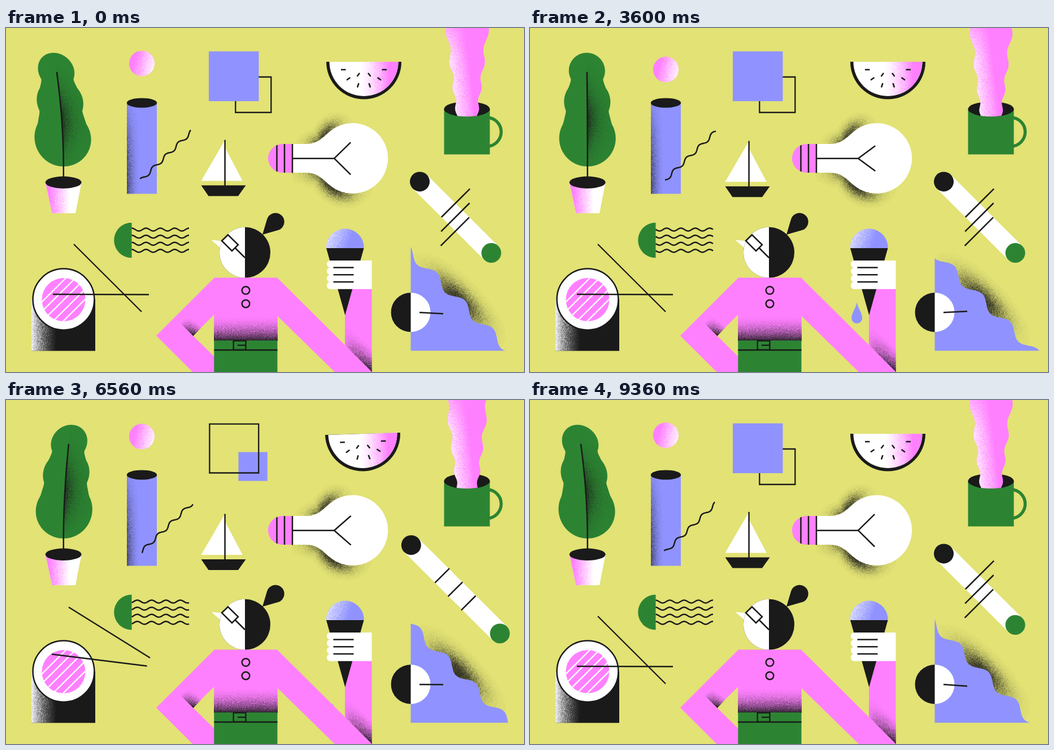
These frames come from a looping animation (917x611 px, 9.44 s). An HTML page with a canvas:

```html
<!DOCTYPE html>
<html lang="en">
<head>
<meta charset="utf-8">
<title>Shapes in motion</title>
<style>
html, body { margin: 0; width: 100%; height: 100%; overflow: hidden; background: #e2e275; }
canvas { display: block; }
</style>
</head>
<body>
<canvas id="stage" width="917" height="611"></canvas>
<script>
const ctx = document.getElementById('stage').getContext('2d');
const LOOP = 9440, STEP = 80, TAU = Math.PI * 2;
const BG = '#e2e275', PINK = '#ff80ff', BLUE = '#9093ff', GREEN = '#2c8432', INK = '#1a1a1a', WHITE = '#fff';

const clamp = (v, a = 0, b = 1) => Math.min(b, Math.max(a, v));
const mix = (a, b, k) => a + (b - a) * k;
const mixAll = (a, b, k) => a.map((v, i) => mix(v, b[i], k));
const ease = k => (1 - Math.cos(Math.PI * clamp(k))) / 2;
const bell = k => Math.exp(-k * k);

let seed = 7;
function rnd() {
  seed = (seed * 1664525 + 1013904223) >>> 0;
  return seed / 4294967296;
}

// Fine grained shade, drawn once; density(x, y) uses stage coordinates.
function grain(x, y, w, h, color, density) {
  const img = document.createElement('canvas');
  img.width = w;
  img.height = h;
  const g = img.getContext('2d');
  g.fillStyle = color;
  for (let j = 0; j < h; j++)
    for (let i = 0; i < w; i++) {
      const d = density(x + i, y + j);
      if (d < 0.01) continue;
      g.globalAlpha = clamp(d + (rnd() - 0.5) * 1.8 * d * (1 - d));
      g.fillRect(i, j, 1, 1);
    }
  return { img, x, y };
}

const svg = d => new Path2D(d);
function poly(...pts) {
  const p = new Path2D();
  for (let i = 0; i < pts.length; i += 2) p.lineTo(pts[i], pts[i + 1]);
  p.closePath();
  return p;
}
function box(x, y, w, h) {
  const p = new Path2D();
  p.rect(x, y, w, h);
  return p;
}
function oval(x, y, rx, ry = rx, a = 0, b = TAU) {
  const p = new Path2D();
  p.ellipse(x, y, rx, ry, 0, a, b);
  return p;
}
function fill(path, color) {
  ctx.fillStyle = color;
  ctx.fill(path);
}
function stroke(path, w = 2.5, color = INK) {
  ctx.lineWidth = w;
  ctx.strokeStyle = color;
  ctx.stroke(path);
}
function line(x1, y1, x2, y2, w = 2.5, color = INK) {
  const p = new Path2D();
  p.moveTo(x1, y1);
  p.lineTo(x2, y2);
  stroke(p, w, color);
}
function within(path, draw) {
  ctx.save();
  ctx.clip(path);
  draw();
  ctx.restore();
}
const dust = g => ctx.drawImage(g.img, g.x, g.y);
function shaded(path, color, g) {
  fill(path, color);
  within(path, () => dust(g));
}
function wave(x, y, dx, dy, count, amp, phase, w = 2.5) {
  const len = Math.hypot(dx, dy), nx = -dy / len, ny = dx / len, p = new Path2D();
  for (let i = 0; i <= 120; i++) {
    const s = i / 120, o = -amp * Math.cos(TAU * (count * s - phase));
    p.lineTo(x + dx * s + nx * o, y + dy * s + ny * o);
  }
  stroke(p, w);
}

const tex = {
  leaf: grain(60, 44, 110, 204, INK, (x, y) =>
    x < 102 ? 0 : 0.75 * Math.exp(-(x - 102) / 14) * bell((y - 162) / 50)),
  pot: grain(68, 274, 68, 58, PINK, x => clamp(1.1 - (x - 72) / 36)),
  ball: grain(-24, -24, 48, 48, WHITE, (x, y) => 0.9 * clamp((x + y * 0.25 + 14) / 36)),
  tube: grain(214, 130, 54, 166, INK, (x, y) =>
    0.55 * clamp(1 - (x - 214) / 24) ** 2 * clamp((y - 120) / 120, 0.2)),
  melon: grain(-64, 0, 130, 66, PINK, x => clamp((x + 8) / 52) ** 1.4),
  steam: grain(770, 0, 94, 160, WHITE, (x, y) =>
    0.75 * clamp(1 - (x - 816 + 0.122 * (313 - y)) / 34) * clamp(0.45 + y / 90)),
  bulb: grain(505, 150, 185, 170, INK, (x, y) => {
    const up = y < 231.5;
    const gap = Math.min(Math.hypot(x - 614, y - 231.5) - 62.5, Math.abs(y - 231.5) - 25.5);
    return 0.8 * bell(Math.max(gap, 0) / 14) * bell((x - (up ? 562 : 574)) / (up ? 24 : 36));
  }),
  sushi: grain(45, 480, 114, 94, WHITE, x => 0.9 * clamp(1 - (x - 46) / 44) ** 1.4),
  torso: grain(368, 500, 113, 56, INK, (x, y) => 0.92 * clamp((y - 508) / 47) ** 2.1),
  elbow: grain(296, 500, 60, 50, INK, (x, y) => {
    const q = (x - 331 - y + 546) / 1.414, r = (331 - x + 546 - y) / 1.414;
    return q < 0 || r < 0 ? 0 : clamp(1 - q / 22) ** 1.4 * clamp(1 - r / 32);
  }),
  wrist: grain(600, 520, 48, 91, INK, (x, y) =>
    0.9 * clamp(1 - (x - y - 37) / 44) ** 1.8 * clamp((x - 596) / 46)),
  scoop: grain(566, 352, 68, 40, WHITE, (x, y) =>
    0.75 * clamp(1 - (x - 568 + (y - 356) * 0.35) / 48)),
  slope: grain(722, 400, 190, 173, INK, (x, y) =>
    0.85 * bell(clamp(x - y - 318, 0, 99) / 27) * bell((x + y - 1282) / 76))
};

const bulbShape = svg('M507 206L530 206C552 206 560 195 573 184A62.5 62.5 0 1 1 573 279C560 268 552 257 530 257L507 257Z');
const bulbCap = svg('M507 206L489.5 206A25.5 25.5 0 0 0 489.5 257L507 257Z');
const scoopShape = svg('M567 391L567 386A33.5 33.5 0 0 1 633.5 386L633.5 391Z');
const dropShape = svg('M0 -19C2 -8 9.5 0 9.5 9A9.5 9.5 0 0 1 -9.5 9C-9.5 0 -2 -8 0 -19Z');

function plant(p) {
  const sway = -Math.cos(TAU * p);
  const bend = y => 12.9 * sway * (clamp(246 - y, 0, 200) / 170) ** 1.9;
  const lobes = [[76, 32], [131, 41], [196, 50]];
  const half = y => Math.cbrt(lobes.reduce((s, [c, r]) => s + Math.max(0, r * r - (y - c) ** 2) ** 1.5, 0));
  const leaf = new Path2D();
  for (let y = 44; y <= 246; y += 0.5) leaf.lineTo(101.8 + bend(y) - half(y), y);
  for (let y = 246; y >= 44; y -= 0.5) leaf.lineTo(101.8 + bend(y) + half(y), y);
  fill(leaf, GREEN);
  within(leaf, () => {
    const { img, x, y } = tex.leaf;
    for (let j = 0; j < img.height; j += 2)
      ctx.drawImage(img, 0, j, img.width, 2, x + Math.round(bend(y + j)), y + j, img.width, 2);
  });
  const stem = new Path2D();
  for (let y = 78; y <= 270; y += 4) stem.lineTo(101.8 + bend(y) * 0.95, y);
  stroke(stem);
  shaded(poly(70, 275, 133.5, 275, 123, 329, 81.5, 329), WHITE, tex.pot);
  fill(oval(101.7, 274.3, 32, 10.7), INK);
}

function cylinder(p2, p4) {
  ctx.save();
  ctx.translate(240.5, 68.6 - 6.2 * Math.cos(TAU * (p4 + 0.07)));
  shaded(oval(0, 0, 22.6), PINK, tex.ball);
  ctx.restore();
  shaded(box(214, 133, 53, 161.5), BLUE, tex.tube);
  fill(oval(240.5, 133, 26.7, 8.6), INK);
  wave(239.2, 270, 90, -86.5, 4, 3, p2);
}

function squares(e) {
  const [bx, by, bs] = mixAll([359, 41.5, 88.5], [412.3, 93.3, 50.7], e);
  const [ox, oy, os] = mixAll([406.3, 87, 63], [359.7, 42, 87.2], e);
  const outline = () => stroke(box(ox, oy, os, os), 2.3);
  if (e < 0.5) outline();
  fill(box(bx, by, bs, bs), BLUE);
  if (e >= 0.5) outline();
}

function melon(p) {
  const u = clamp((p - 0.05) / 0.4);
  const turn = -0.21 * Math.sin(3 * Math.PI * u) * (1 - u);
  ctx.save();
  ctx.translate(633.5 + 66.5 * turn, 60);
  ctx.rotate(turn);
  fill(oval(0, 0, 66.5, 66.5, 0, Math.PI), INK);
  shaded(oval(0, 0, 61, 61, 0, Math.PI), WHITE, tex.melon);
  for (const s of [-1, 1]) {
    line(s * 32, 14, s * 40.5, 14);
    line(s * 24, 28, s * 30.5, 32.5);
    line(s * 7.5, 20, s * 12, 26);
    line(s * 9, 38, s * 11.5, 45.5);
  }
  ctx.restore();
}

function mug(p) {
  stroke(oval(851, 184.6, 25.6), 5.5, GREEN);
  fill(box(775.5, 144, 81, 80.5), GREEN);
  fill(oval(816, 144, 40.7, 13.3), INK);
  const open = box(700, 0, 217, 144);
  open.addPath(oval(816, 144, 40.7, 13.3));
  const half = y => {
    const d = 313 - y, s = Math.log(d / 168) / Math.log(1.22) - p;
    return d * (0.115 + 0.0105 * Math.cos(TAU * s));
  };
  const steam = new Path2D();
  for (let y = -2; y <= 160; y++) steam.lineTo(816.3 - half(y), y);
  for (let y = 160; y >= -2; y--) steam.lineTo(816.3 + half(y), y);
  within(open, () => shaded(steam, PINK, tex.steam));
}

function bulb(p) {
  dust(tex.bulb);
  fill(bulbShape, WHITE);
  fill(bulbCap, PINK);
  for (const x of [479.5, 493]) within(bulbCap, () => line(x, 200, x, 262));
  line(507, 206, 507, 257.5);
  line(507, 231.7, 581, 231.7);
  const h = 16.5 + 12.3 * Math.cos(TAU * (p + 0.027)), x = 615 - 0.17 * h;
  for (const s of [-1, 1]) line(581, 231.7, x, 231.7 + s * h);
}

function boat(p) {
  ctx.save();
  ctx.translate(0, 2 - 2 * Math.cos(TAU * p));
  fill(poly(387, 200, 387, 271.5, 345.5, 271.5), WHITE);
  fill(poly(387, 211, 418.8, 271.5, 387, 271.5), WHITE);
  fill(poly(345.5, 279.5, 424.5, 279.5, 411, 298.5, 358.5, 298.5), INK);
  line(387.6, 198.8, 387.6, 280);
  ctx.restore();
}

function capsule(e) {
  const d = mix(63.3, 79, e), x = 795.8, y = 336.2;
  line(x - d, y - d, x + d, y + d, 35, WHITE);
  fill(oval(x - d, y - d, 17.5), INK);
  fill(oval(x + d, y + d, 17.5), GREEN);
  const r = mix(25.2, 12.4, e);
  for (const i of [-1, 0, 1]) {
    const cx = 795.4 + i * mix(-0.6, 24, e), cy = y + i * mix(25.4, 24.3, e);
    line(cx - r, cy + r, cx + r, cy - r);
  }
}

function jellyfish(p) {
  fill(oval(222.5, 377, 31.3, 31.3, Math.PI / 2, Math.PI * 1.5), GREEN);
  for (let i = 0; i < 4; i++) wave(222.5, 358 + i * 12.6, 101.5, 0, 4, 2.5, p);
}

function sushi(p) {
  shaded(box(45, 482, 113, 91.5), INK, tex.sushi);
  const roll = oval(102, 482, 54.4);
  fill(roll, WHITE);
  stroke(roll);
  const core = oval(102, 482.5, 38.5);
  fill(core, PINK);
  within(core, () => {
    for (const o of [-17, -8.5, 0.5, 10, 19])
      line(62 + o, 522 + o, 142 + o, 442 + o, 2.3, WHITE);
  });
  const crossed = [120, 384, 240, 504, 83, 473, 253, 473.5];
  const lifted = [111, 368, 255, 458, 81, 451.5, 249.5, 472.5];
  const joined = [98, 395, 260, 446.5, 88.5, 422.5, 245.5, 487];
  const d = Math.abs(p - 0.551);
  const pose = d > 0.16
    ? mixAll(lifted, crossed, ease((d - 0.162) / 0.046))
    : mixAll(joined, lifted, ease((d - 0.075) / 0.085));
  line(...pose.slice(0, 4), 2.3);
  line(...pose.slice(4), 2.3);
}

function drop(x, y, color) {
  ctx.save();
  ctx.translate(x, y);
  fill(dropShape, color);
  ctx.restore();
}

function person(t) {
  // head
  fill(svg('M454 367L462 340A15.6 15.6 0 1 1 480 359.5Z'), INK);
  fill(poly(363.5, 376.5, 385, 378.5, 379, 390), WHITE);
  fill(oval(423, 398.7, 45), INK);
  fill(oval(423, 398.7, 45, 45, Math.PI / 2, Math.PI * 1.5), WHITE);
  const lens = poly(382, 378, 393, 367.3, 411, 385, 400, 396);
  fill(lens, WHITE);
  stroke(lens);
  line(405.5, 390.5, 423, 408);

  // forearm, cone and drips
  fill(poly(600, 463, 647.5, 463, 647.5, 611, 600, 563), PINK);
  dust(tex.wrist);
  fill(poly(567, 391, 633.5, 391, 600.3, 510), INK);
  shaded(scoopShape, BLUE, tex.scoop);
  const blueY = 326 + 0.161 * ((t + 160) % 2640);
  if (blueY < 582) within(box(560, 388, 60, 223), () => drop(578.7, blueY, BLUE));

  fill(poly(480, 443.5, 648, 611, 582, 611, 480, 511), PINK);
  const whiteY = 567 + 0.128 * ((t + 1160) % 2640 - 760);
  if (t > 1000 && whiteY < 632) within(box(600, 463, 60, 148), () => drop(620, whiteY, WHITE));

  // hand
  fill(box(574, 413, 73.5, 50.7), WHITE);
  for (let i = 0; i < 4; i++) fill(oval(574.2, 419.3 + i * 12.7, 6.4), WHITE);
  for (let i = 0; i < 3; i++) line(579.5, 425.6 + i * 12.7, 615.5, 425.6 + i * 12.7);

  // body
  fill(poly(369, 443.5, 266, 546.5, 330.5, 611, 369, 611, 369, 584, 331, 546.5, 369, 508.5), PINK);
  dust(tex.elbow);
  fill(box(368.3, 443.5, 112.2, 112), PINK);
  dust(tex.torso);
  for (const y of [466, 489.7]) stroke(oval(424.5, y, 6.8));
  fill(box(368.3, 555, 112.2, 56), GREEN);
  line(368.3, 572, 480.5, 572, 2.3);
  stroke(box(402.7, 555.7, 21.8, 16), 2.3);
  line(410, 563.5, 424, 563.5, 2.3);
}

function slope(p) {
  dust(tex.slope);
  const hill = new Path2D();
  hill.moveTo(690, 640);
  for (let x = 690; x <= 950; x++) {
    const o = 5.3 * Math.cos(TAU * ((x - 757.7) / 49.5 - p));
    hill.lineTo(x + o, x - 318 - o);
  }
  hill.lineTo(950, 640);
  within(box(716.5, 380, 200, 193.3), () => fill(hill, BLUE));
  fill(oval(716.5, 505, 35), WHITE);
  fill(oval(716.5, 505, 35, 35, Math.PI / 2, Math.PI * 1.5), INK);
  const u = ((p + 0.28) % 1) / 0.314;
  const tip = u < 1 ? -3.2 * Math.sin(TAU * u) : 0;
  line(732, 505.2, 774, 505.6 + tip);
}

function draw(t) {
  const phase = n => (t * n / LOOP) % 1;
  const p = phase(2);
  const swap = (full, back) => ease((p - 0.15) / (full - 0.15)) * (1 - ease((p - back) / (0.7 - back)));
  ctx.fillStyle = BG;
  ctx.fillRect(0, 0, 917, 611);
  plant(p);
  cylinder(p, phase(4));
  squares(swap(0.41, 0.45));
  melon(p);
  mug(phase(5));
  bulb(phase(3));
  boat(p);
  capsule(swap(0.42, 0.47));
  jellyfish(p);
  sushi(p);
  person(t);
  slope(p);
}

const start = performance.now();
function tick() {
  const t = (performance.now() - start) % LOOP;
  draw(Math.floor(t / STEP) * STEP);
  requestAnimationFrame(tick);
}
tick();
</script>
</body>
</html>
```
